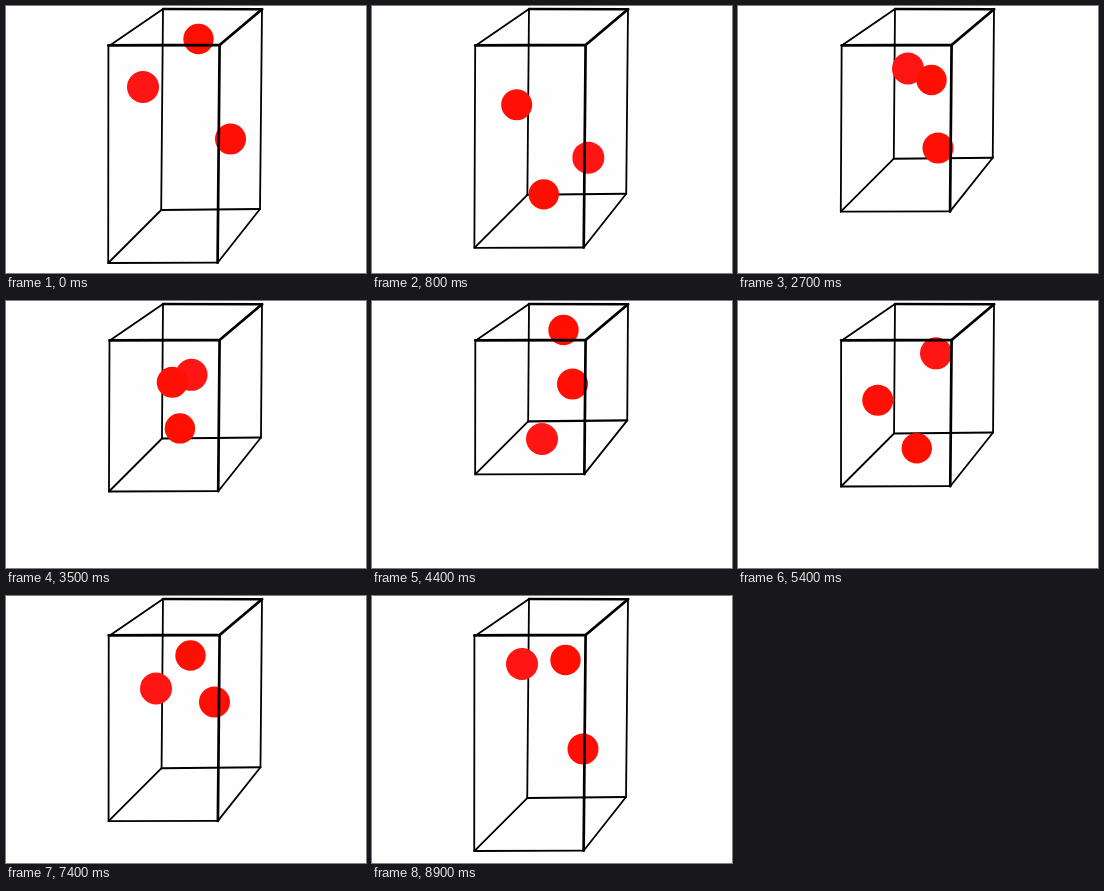
Write an HTML page with a canvas that moves like this. It is 360 px wide and 267 px high and loops after 9000 ms.

```html
<!DOCTYPE html>
<html lang="en">
<head>
<meta charset="utf-8">
<title>Gas in a shrinking box</title>
<style>
  html, body { margin: 0; width: 100%; height: 100%; overflow: hidden; background: #fefefe; }
  canvas { display: block; width: 360px; height: 267px; }
</style>
</head>
<body>
<canvas id="stage" width="360" height="267"></canvas>
<script>
const ctx = document.getElementById('stage').getContext('2d');
const LOOP = 9, TURN = 4.6, CYCLE = 1.7;
const LEFT = 134, RIGHT = 227, TOP = 27;

// Known poses: time in seconds, then x, y of each ball
const poses = [
  [0, 137, 81, 192.5, 33, 224.5, 133],
  [1.5, 163, 66.5, 198, 81, 197.5, 162],
  [2.7, 170, 62.5, 193.5, 74, 200, 142],
  [4.4, 170, 138, 191.5, 29, 200.5, 83],
  [6.4, 156, 119, 173, 44, 212, 81],
  [7.4, 150, 92.5, 184.5, 59.5, 208.5, 106],
  [8.9, 150, 68, 193.5, 64, 211, 153]
];
poses.push([LOOP, ...poses[0].slice(1)]);

const balls = [
  { r: 16, color: '#ff1514', dir: [-1, 1] },
  { r: 15.2, color: '#ff0f02', dir: [-1, -1] },
  { r: 15.5, color: '#ff0f05', dir: [1, -1] }
];

const mix = (a, b, k) => a + (b - a) * k;
const squeeze = t => t < TURN ? t / TURN : (LOOP - t) / (LOOP - TURN);
const floorY = t => 257 - 87.4 * squeeze(t);
const range = (axis, t) => axis ? [TOP, floorY(t) - 32] : [LEFT, RIGHT];

// Triangle wave: 0 at the near wall, 1 at the far wall
const bounce = p => 1 - Math.abs(1 - 2 * (p - Math.floor(p)));

// Unfold the bounces so that each axis becomes a steadily growing phase
function phases(i, axis) {
  let last;
  return poses.map((pose, n) => {
    const t = pose[0], [lo, hi] = range(axis, t);
    const p = (pose[1 + 2 * i + axis] - lo) / (hi - lo) / 2;
    if (!n) return last = balls[i].dir[axis] * p;
    const goal = last + (t - poses[n - 1][0]) / CYCLE;
    const [a, b] = [p, -p].map(q => q + Math.round(goal - q));
    return last = Math.abs(a - goal) < Math.abs(b - goal) ? a : b;
  });
}
balls.forEach((ball, i) => ball.phase = [phases(i, 0), phases(i, 1)]);

function place(ball, axis, t) {
  const n = poses.findIndex(p => p[0] > t);
  const [t0, t1] = [poses[n - 1][0], poses[n][0]];
  const phase = mix(ball.phase[axis][n - 1], ball.phase[axis][n], (t - t0) / (t1 - t0));
  return mix(...range(axis, t), bounce(phase));
}

function line(width, ...points) {
  ctx.lineWidth = width;
  ctx.beginPath();
  points.forEach(p => ctx.lineTo(...p));
  ctx.stroke();
}

function draw(t) {
  const s = squeeze(t), y = floorY(t);
  const lean = t < 1.5 ? t / 1.5 : (LOOP - t) / 7.5;
  const topBL = [157, 3], topBR = [256, 3.2], topFR = [213.6, 39];
  const topFL = [102.4 + 1.5 * lean, 39.3];
  const lowBL = [155.2 + s, y - 53], lowBR = [254 + 1.3 * s, y - 54];
  const lowFL = [102.2 + s, y], lowFR = [211.6 + 0.8 * s, y - 0.3];

  ctx.fillStyle = '#fefefe';
  ctx.fillRect(0, 0, 360, 267);
  ctx.strokeStyle = '#000';
  ctx.lineCap = ctx.lineJoin = 'round';

  line(1.8, [104.5, 39], topBL, lowBL, lowFL);
  line(2.1, lowBL, lowBR);
  line(1.8, topBR, lowBR, lowFR);
  line(2.6, topBL, topBR);

  for (const ball of balls) {
    ctx.fillStyle = ball.color;
    ctx.beginPath();
    ctx.arc(place(ball, 0, t), place(ball, 1, t), ball.r, 0, 7);
    ctx.fill();
  }

  line(1.8, topFL, lowFL, lowFR);
  line(2.8, topFL, topFR, topBR);
  line(2.7, topFR, lowFR);
}

function tick() {
  draw(Math.floor(performance.now() / 100) % 90 / 10);
  requestAnimationFrame(tick);
}
tick();
</script>
</body>
</html>
```
